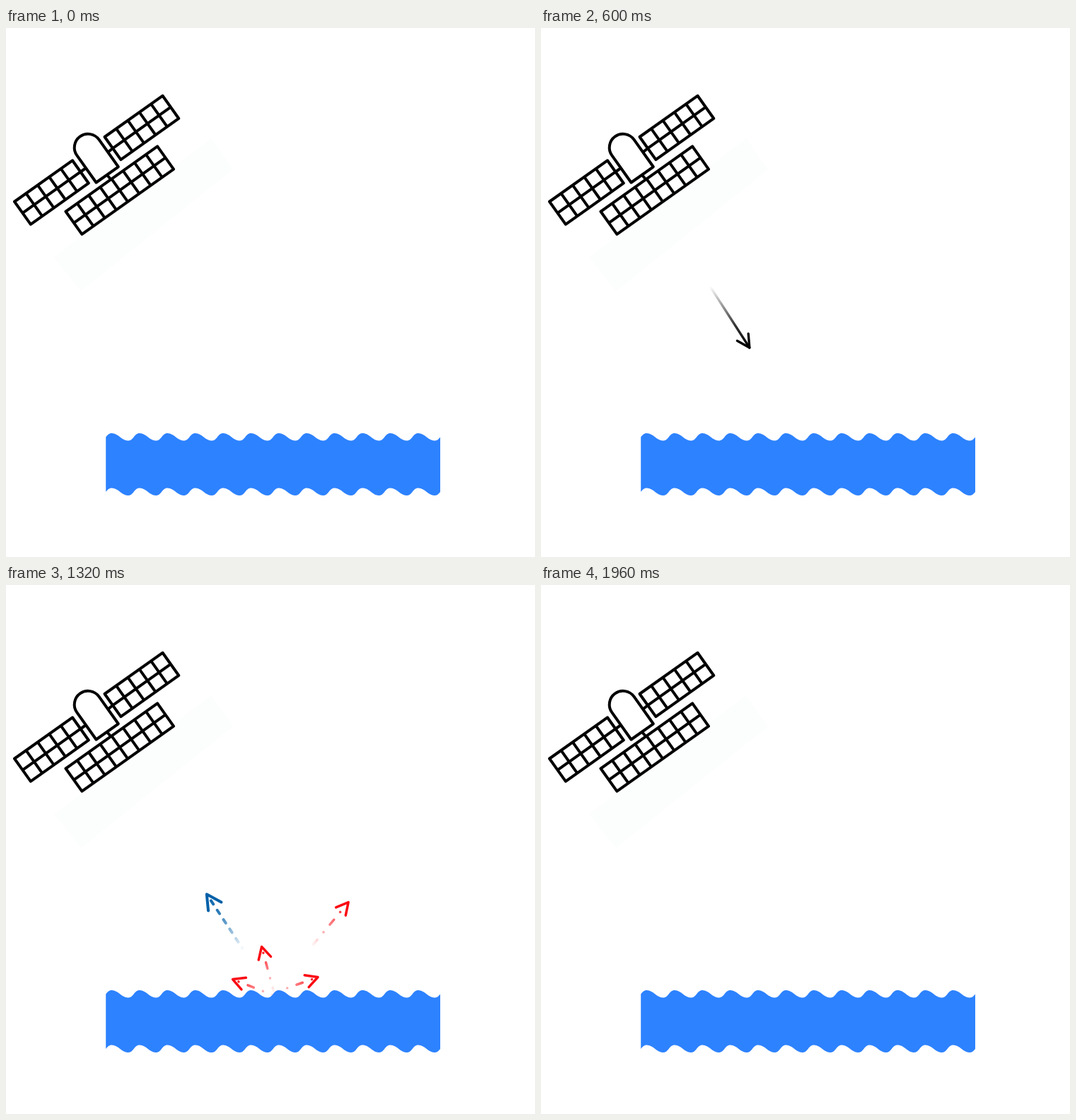
These frames come from a looping animation (748 px wide and 748 px high, 2.21 s). An HTML page:

```html
<!DOCTYPE html>
<html lang="en">
<head>
<meta charset="utf-8">
<title>Satellite signal scattering</title>
<style>
  html, body { margin: 0; width: 100%; height: 100%; overflow: hidden; background: #fff; }
  svg { display: block; width: 100vw; height: 100vh; }
</style>
</head>
<body>
<svg id="stage" viewBox="0 0 748 748">
  <defs id="defs"></defs>
  <path d="M290 156L321 200L106 372L68 324Z" fill="#fcfdfd"/>
  <g id="satellite" fill="none" stroke="#000" stroke-width="4" stroke-linejoin="round"></g>
  <g id="arrows" fill="none" stroke-linecap="round" stroke-linejoin="round"></g>
  <path id="water" fill="#2d82ff"/>
</svg>
<script>
const LOOP = 2210, STEP = 40, LAST = 1960;
const $ = id => document.getElementById(id);
const clamp = v => Math.max(0, Math.min(1, v));

function add(parent, tag, attrs) {
  const el = document.createElementNS('http://www.w3.org/2000/svg', tag);
  set(el, attrs);
  parent.append(el);
  return el;
}

function set(el, attrs) {
  for (const key in attrs) el.setAttribute(key, attrs[key]);
}

const TILT = 'rotate(-35.4)';

function addPanel(x, y, width, columns) {
  const height = 39.5;
  let d = `M0 0H${width}V${height}H0ZM0 ${height / 2}H${width}`;
  for (let i = 1; i < columns; i++) d += `M${i * width / columns} 0V${height}`;
  add($('satellite'), 'path', { d, transform: `translate(${x} ${y}) ${TILT}` });
}

addPanel(139.5, 154, 100.5, 5);
addPanel(12, 245.5, 100.5, 5);
addPanel(84.5, 259.5, 159, 8);
add($('satellite'), 'path', { d: 'M151 170L145 175M106 203L113 198M143 208L149 215' });
add($('satellite'), 'path', {
  d: 'M0 0V-47A19.2 19.2 0 0 1 38.4 -47V0Z',
  transform: `translate(127.5 218.5) ${TILT}`
});

const WAVES = 12;
const forward = 'c3 -4 5 -5.5 8.5 -5.5c9 0 14 10.5 22.5 10.5c4 0 6 -2 8.4 -5';
const backward = 'c-2.4 3 -4.4 5 -8.4 5c-8.5 0 -13.5 -10.5 -22.5 -10.5c-3.5 0 -5.5 1.5 -8.5 5.5';
$('water').setAttribute('d', `M141.2 578.5${forward.repeat(WAVES)}v77.5${backward.repeat(WAVES)}Z`);

// Each arrow leaves `from` at `start` with velocity `v` in px/ms.
const hit = { from: [378, 580], start: 980, size: () => 1, red: true };
const red = { ...hit, color: '#fa0a12', width: 3.5, head: 19, dash: '0 14 9 14' };
const fast = { ...red, length: 82, gap: 18, fadeOut: 1600 };
const slow = { ...red, length: 68, gap: 9, fadeOut: 1360 };

const arrows = [
  { from: [182, 277], v: [.217, .3365], start: 80, color: '#000', width: 4, head: 24,
    length: 124, gap: 0, dash: 'none', fadeOut: 880, size: t => .52 + .0006 * (t - 80) },
  { ...hit, v: [-.277, -.42], color: '#0060a8', width: 4, head: 23.5,
    length: 95, gap: 11, dash: '6 10', fadeOut: 1590, shaftDelay: 100 },
  { ...fast, from: [376, 579], v: [.318, -.3835] },
  { ...slow, v: [-.169, -.066] },
  { ...slow, from: [379.5, 578.5], v: [-.053, -.197] },
  { ...slow, from: [375, 578], v: [.194, -.069] }
];

const FADE = 240, SPREAD = 28 * Math.PI / 180;

arrows.forEach((a, i) => {
  const gradient = add($('defs'), 'linearGradient', {
    id: `fade${i}`, gradientUnits: 'userSpaceOnUse', x1: 0, y1: 0, x2: -a.length, y2: 0
  });
  a.stops = [0, .36, 1].map(offset =>
    add(gradient, 'stop', { offset, 'stop-color': a.color, 'stop-opacity': 0 }));
  a.group = add($('arrows'), 'g', { 'stroke-width': a.width });
  a.shaft = add(a.group, 'path', { stroke: `url(#fade${i})`, 'stroke-dasharray': a.dash });
  const x = -a.head * Math.cos(SPREAD), y = a.head * Math.sin(SPREAD);
  a.tip = add(a.group, 'path', { d: `M${x} ${-y}L0 0L${x} ${y}`, stroke: a.color });
  a.angle = Math.atan2(a.v[1], a.v[0]) * 180 / Math.PI;
});

function drawArrow(a, t) {
  const age = t - a.start;
  const shown = age > 0 && t < LAST;
  a.group.style.display = shown ? '' : 'none';
  if (!shown) return;

  const x = a.from[0] + a.v[0] * age, y = a.from[1] + a.v[1] * age;
  const size = a.size(t);
  const travelled = Math.hypot(...a.v) * age / size;
  const reach = Math.min(a.length, travelled);
  const out = delay => 1 - clamp((t - a.fadeOut - delay) / FADE);
  const tipAlpha = out(0), shaftAlpha = out(a.shaftDelay || 0);

  set(a.group, {
    transform: `translate(${x} ${y}) rotate(${a.angle}) scale(${size})`,
    opacity: clamp(age / FADE)
  });
  set(a.tip, { opacity: tipAlpha });
  set(a.shaft, { d: reach > a.gap ? `M${-a.gap} 0.01L${-reach} 0` : '' });
  set(a.stops[0], { 'stop-opacity': tipAlpha });
  set(a.stops[1], { 'stop-opacity': shaftAlpha * (a.red && !a.shaftDelay ? .65 : .8) });
}

function render(now) {
  const time = now % LOOP;
  const t = Math.min(LAST, Math.floor(time / STEP) * STEP);
  arrows.forEach(a => drawArrow(a, t));
}

const begin = performance.now();
function tick() {
  render(performance.now() - begin);
  requestAnimationFrame(tick);
}
tick();
</script>
</body>
</html>
```
